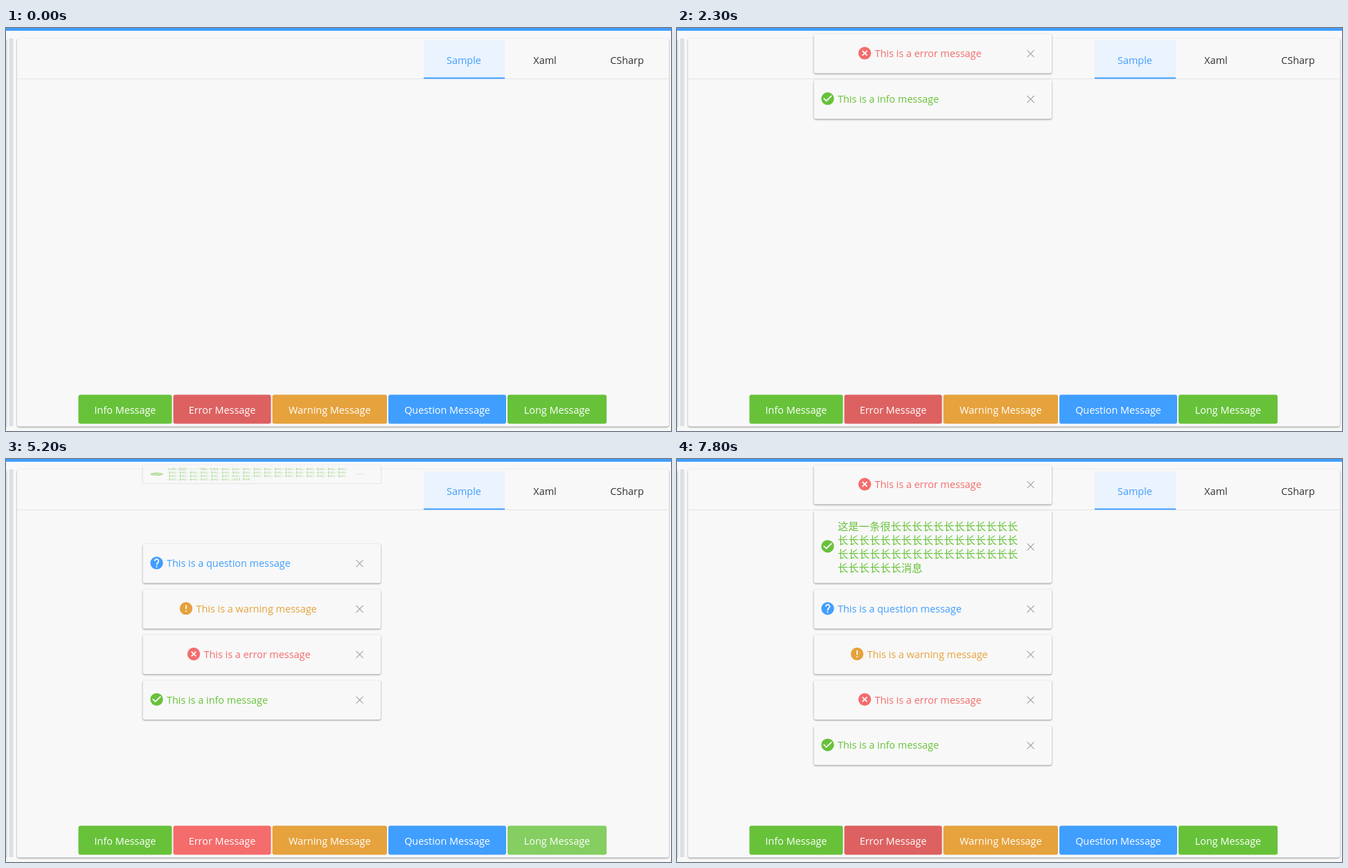
Animation of 960 by 583 pixels, one loop 8000 ms. Source, as an HTML page:

```html
<!DOCTYPE html>
<html lang="en">
<head>
<meta charset="utf-8">
<title>Message demo</title>
<style>
  html, body { margin: 0; width: 100%; height: 100%; overflow: hidden; background: #f8f8f8; }
  svg { display: block; }
  text { font: 14.4px "Open Sans", "Noto Sans", sans-serif; }
  .zh { font: 15.3px "Noto Sans CJK SC", "Noto Sans CJK", sans-serif; }
  .mid { text-anchor: middle; }
  .panel { fill: #f8f8f8; filter: drop-shadow(0 1px 1.3px rgba(0, 0, 0, .42)); }
  .mark { fill: none; stroke: #f8f8f8; stroke-width: 2; }
  .close { fill: none; stroke: #a4a4a4; stroke-width: 1.1; }
</style>
</head>
<body>
<svg width="960" height="583" viewBox="0 0 960 583">
  <rect width="960" height="4" fill="#409eff"/>
  <rect class="panel" x="-20" y="15" width="20.5" height="561.5" rx="3"/>
  <rect x="4.5" y="15" width="6" height="561" fill="#dce0e5"/>
  <rect class="panel" x="16" y="15" width="941" height="561.5" rx="3"/>
  <rect x="16" y="73" width="941" height="1" fill="#e4e5e7"/>
  <rect x="603" y="18" width="117" height="55" fill="#eaf3fe"/>
  <rect x="603" y="71.5" width="117" height="2" fill="#409eff"/>
  <g class="mid" fill="#303133">
    <text x="661" y="52" fill="#409eff">Sample</text>
    <text x="778" y="52">Xaml</text>
    <text x="896.5" y="52">CSharp</text>
  </g>
  <g id="buttons" class="mid"></g>
  <g id="cards"></g>
</svg>
<script>
const LOOP = 8000, STEP = 100, TOP = 8.8, GAP = 9;
const GREEN = '#67c23a', RED = '#f56c6c', ORANGE = '#e6a23c', BLUE = '#409eff';

const icons = {
  check: 'M5.7 11.3L10 15.5L18.3 7.3',
  cross: 'M8.3 8.3L15.7 15.7M15.7 8.3L8.3 15.7',
  alert: 'M12 6.5V13M12 15V17.2',
  help: 'M9 9a3 3 0 1 1 5.1 2.1C12.9 12.2 12 12.9 12 15.2M12 16.8V19'
};

const long = '长'.repeat(17);
const longLines = ['这是一条很' + '长'.repeat(12), long, long, '长'.repeat(6) + '消息'];

// x: icon centre inside the stage
const kinds = [
  { name: 'Info', left: 104.5, right: 239.5, normal: GREEN, hover: '#85ce61', focus: '#5daf34', icon: 'check', x: 217.5 },
  { name: 'Error', left: 241.5, right: 382.5, normal: RED, hover: '#f78989', focus: '#dd6161', icon: 'cross', x: 271 },
  { name: 'Warning', left: 384.5, right: 550, normal: ORANGE, hover: '#ebb563', focus: '#cf9236', icon: 'alert', x: 260 },
  { name: 'Question', left: 552, right: 722, normal: BLUE, hover: '#66b1ff', focus: '#3a8ee6', icon: 'help', x: 217.5 },
  { name: 'Long', left: 724, right: 867, normal: GREEN, hover: '#85ce61', focus: '#5daf34', icon: 'check', x: 217.5, lines: longLines }
];

// Pointer actions; the first one happened before the loop starts
const actions = [
  [-999, -999, -999, 1],
  [700, 800, 1000, 0],
  [1600, 2000, 2000, 1],
  [2600, 2900, 2900, 2],
  [3400, 3700, 3700, 3],
  [4900, 5100, 5100, 4],
  [6500, 6900, 6900, 1]
].map(([hover, press, click, kind]) => ({ hover, press, click, kind }));

function add(parent, tag, attrs, text) {
  const el = document.createElementNS('http://www.w3.org/2000/svg', tag);
  for (const key in attrs) el.setAttribute(key, attrs[key]);
  if (text) el.textContent = text;
  return parent.appendChild(el);
}

const buttonLayer = document.getElementById('buttons');
const cardLayer = document.getElementById('cards');

const buttons = kinds.map(({ name, left, right }) => {
  const box = add(buttonLayer, 'rect', { x: left, y: 530.5, width: right - left, height: 42, rx: 3 });
  add(buttonLayer, 'text', { x: (left + right) / 2, y: 557.5, fill: '#fff' }, name + ' Message');
  return box;
});

function makeCard({ click, kind }) {
  const { name, normal, icon, x, lines } = kinds[kind];
  const height = lines ? 105 : 56.8;
  const mid = height / 2;
  const el = add(cardLayer, 'g', {});
  add(el, 'rect', { class: 'panel', x: 197.5, y: 0, width: 343.5, height, rx: 3 });
  const badge = add(el, 'g', { transform: `translate(${x} ${mid - .8}) scale(.917) translate(-12 -12)` });
  add(badge, 'circle', { cx: 12, cy: 12, r: 10, fill: normal });
  add(badge, 'path', { class: 'mark', d: icons[icon] });
  if (lines) {
    lines.forEach((line, i) => add(el, 'text', { class: 'zh', x: 232, y: 28 + i * 20.2, fill: normal }, line));
  } else {
    add(el, 'text', { x: x + 14.5, y: mid + 5, fill: normal }, `This is a ${name.toLowerCase()} message`);
  }
  add(el, 'path', { class: 'close', d: `M505.5 ${mid - 5}l10 10m0 -10l-10 10` });
  return { el, click, height };
}

const cards = actions.slice(1).map(makeCard).reverse();

function draw(t) {
  const last = key => actions.filter(a => a[key] <= t).pop();
  const hovered = last('hover'), pressed = last('press');
  buttons.forEach((box, i) => {
    const { normal, hover, focus } = kinds[i];
    let fill = normal;
    if (hovered.kind === i && t < hovered.click + 200) fill = hover;
    if (pressed.kind === i && t >= pressed.click + 200 && fill === normal) fill = focus;
    // A focused button keeps its dark tone until another one is pressed
    box.setAttribute('fill', fill);
  });

  let y = TOP;
  for (const { el, click, height } of cards) {
    const age = t - click;
    const shown = age >= STEP;
    el.style.display = shown ? '' : 'none';
    if (!shown) continue;
    const grow = Math.min(1, (age - 33) / 267);
    el.setAttribute('transform', `translate(0 ${y}) scale(1 ${grow})`);
    el.setAttribute('opacity', Math.sqrt(grow));
    y += height + GAP;
  }
}

const start = performance.now();
function tick() {
  const t = (performance.now() - start) % LOOP;
  draw(t - t % STEP);
  requestAnimationFrame(tick);
}
tick();
</script>
</body>
</html>
```
